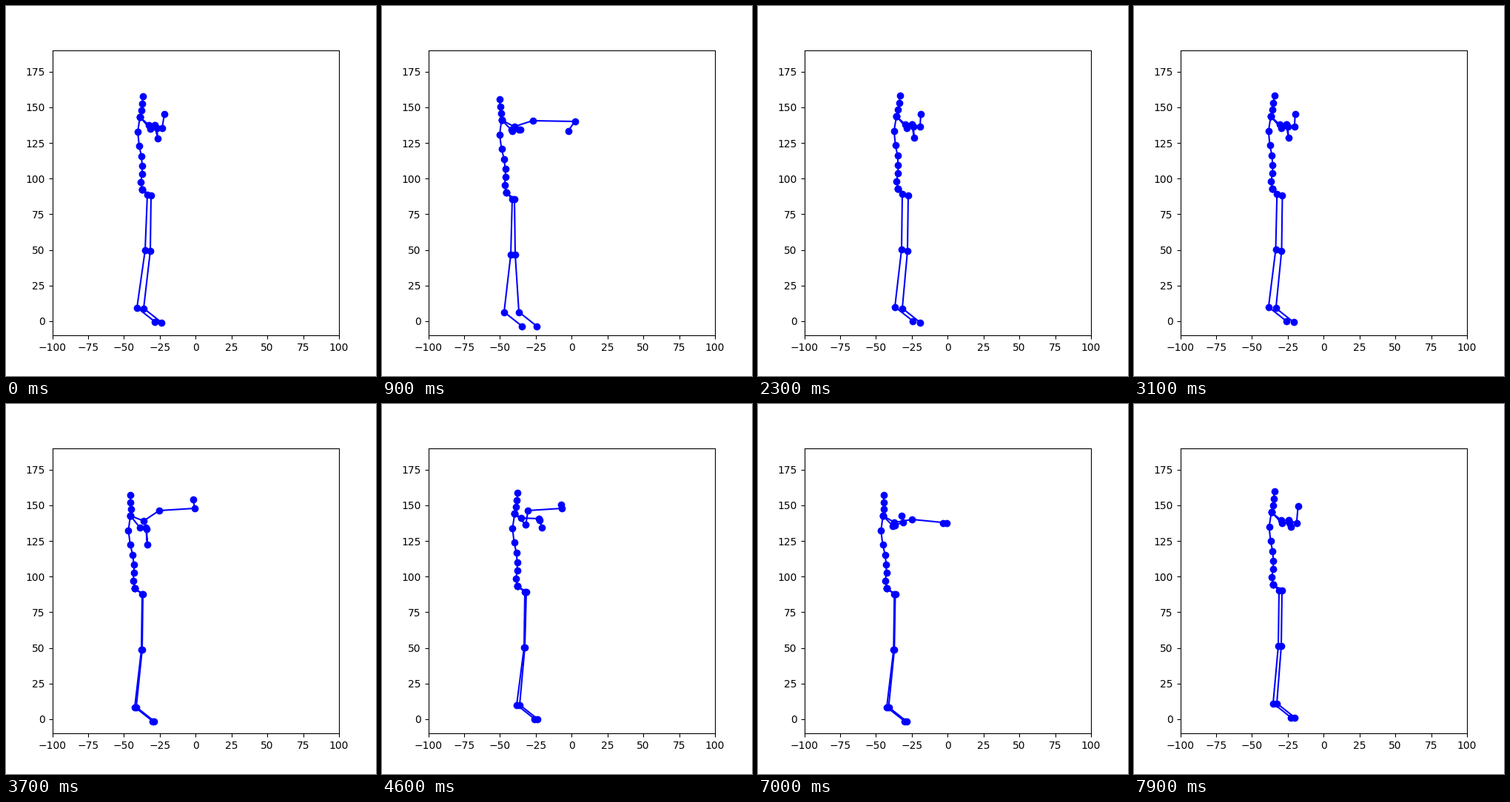
Write a matplotlib script that moves like this. It is 500x500 px and loops after 8000 ms.

```python
import numpy as np
import matplotlib.pyplot as plt
from matplotlib.animation import FuncAnimation

STEP, FRAMES = 100, 80

# Spine from pelvis to head, in stage pixels relative to the pelvis.
SPINE = np.array([(0, 0), (-2, -10), (0, -21), (0, -32), (-1, -45), (-4, -59),
                  (-6, -78), (-3, -98), (-1, -107), (0, -116), (1, -126)], float)
NECK = 7
LEAN = np.minimum(np.arange(11) / NECK, 1)
TILT = np.maximum(np.arange(11) - NECK, 0)

# pelvis x, y, lean, head tilt, then per leg: hip dx, dy, knee dx, ankle dx
BODY = {
    "ready": (184, 248, 0, 0, 7, 7, -3, -11, 12, 8, -1, -9),
    "back": (168, 252, -3.5, -2.3, 8, 9, -2, -9, 11, 9, 1, 5),
    "front": (189, 247, 1, .3, 6, 7, -1, -9, 14, 9, -1, -7),
    "jab": (174, 249, -3, -1.3, 10, 8, -1, -9, 11, 8, -1, -8),
    "cross": (183, 246, -.7, 0, 10, 8, -1, -10, 12, 8, -2, -7),
    "rest": (189, 247, .7, 0, 8, 7, -2, -9, 13, 8, -1, -7),
    "tall": (188, 244, .7, 0, 8, 8, -1, -7, 12, 8, -1, -6),
}

# Collar, shoulder, elbow, wrist of the lead arm, then of the rear arm,
# relative to the neck.
ARMS = {
    "ready": (12, 11, 20, 11, 30, 15, 33, -4, 14, 16, 23, 15, 24, 29, 20, 11),
    "front": (12, 11, 21, 11, 32, 14, 33, -3, 14, 16, 23, 14, 24, 29, 21, 11),
    "rest": (12, 8, 22, 8, 30, 14, 32, -7, 13, 15, 22, 14, 25, 21, 22, 8),
    "tall": (13, 11, 23, 11, 34, 15, 36, -8, 14, 15, 24, 15, 26, 20, 23, 11),
    "cock": (14, 8, 28, 0, 43, -8, 47, -41, 14, 16, 22, 15, 24, 33, 21, 14),
    "jab": (18, 7, 39, -7, 87, -10, 85, -22, 13, 16, 21, 16, 23, 39, 22, 18),
    "hit": (17, 9, 42, 1, 99, 2, 90, 15, 13, 13, 14, 15, 25, 13, 23, 13),
    "reach": (17, 9, 43, 2, 104, 3, 97, 12, 13, 13, 15, 15, 25, 14, 23, 13),
    "load": (12, 8, 30, 8, 36, 18, 36, 2, 15, 15, 20, 4, 36, 2, 38, -28),
    "cross": (9, 6, 33, 7, 37, 19, 34, 9, 15, 15, 18, -4, 64, -7, 63, -12),
    "far": (9, 6, 33, 7, 37, 19, 34, 9, 16, 14, 24, -5, 84, -4, 80, -3),
}

# time, pose, pelvis shift x, y
BODY_KEYS = [
    (0, "ready", 0, 0), (400, "ready", -1, 1), (900, "back", 0, 0),
    (1050, "back", 1, 0), (1500, "ready", 0, 0), (1800, "front", -2, 0),
    (2300, "front", 0, 0), (2900, "front", -1, 0), (3400, "ready", 0, 0),
    (3700, "jab", 0, 0), (3900, "jab", -4, 2), (4300, "cross", -3, 1),
    (4600, "cross", 0, 0), (4800, "cross", 2, 0), (5400, "rest", -2, 0),
    (6000, "rest", 0, 0), (6350, "rest", -3, -2), (6900, "jab", -2, 1),
    (7200, "cross", -1, 0), (7400, "cross", 1, -1), (7700, "tall", -1, 0),
    (7900, "tall", 0, 0),
]

ARM_KEYS = [
    (0, "ready"), (350, "ready"), (550, "cock"), (750, "jab"), (900, "hit"),
    (1000, "reach"), (1400, "ready"), (1800, "front"), (3100, "front"),
    (3500, "cock"), (3700, "jab"), (3900, "hit"), (4300, "ready"),
    (4600, "cross"), (4700, "cross"), (5100, "rest"), (6300, "rest"),
    (6600, "cock"), (6750, "jab"), (6900, "reach"), (7200, "load"),
    (7400, "far"), (7700, "tall"), (7900, "tall"),
]


def smooth(t, times, keys):
    """Cubic through the keys that never overshoots them."""
    h = np.diff(times)[:, None]
    d = np.diff(keys, axis=0) / h
    prod = d[:-1] * d[1:]
    total = d[:-1] + d[1:]
    m = np.zeros_like(keys)
    m[1:-1] = np.where(prod > 0, 2 * prod / np.where(prod > 0, total, 1), 0)
    i = int(np.clip(np.searchsorted(times, t, "right") - 1, 0, len(times) - 2))
    w = h[i, 0]
    u = (t - times[i]) / w
    return ((1 + 2 * u) * (1 - u) ** 2 * keys[i] + u * (1 - u) ** 2 * w * m[i]
            + u * u * (3 - 2 * u) * keys[i + 1] - u * u * (1 - u) * w * m[i + 1])


body_times = np.array([k[0] for k in BODY_KEYS], float)
body_poses = np.array([BODY[k[1]] for k in BODY_KEYS], float)
body_poses[:, :2] += [k[2:] for k in BODY_KEYS]
arm_times = np.array([k[0] for k in ARM_KEYS], float)
arm_poses = np.array([ARMS[k[1]] for k in ARM_KEYS], float)


def leg(root, dx, dy, knee, ankle):
    steps = [(0, 0), (dx, dy), (knee, 75), (ankle, 77.5), (24, 19)]
    return root + np.cumsum(steps, axis=0)


def skeleton(t):
    b = smooth(t, body_times, body_poses)
    root = b[:2]
    spine = root + SPINE
    spine[:, 0] += b[2] * LEAN + b[3] * TILT
    neck = spine[NECK]
    arms = smooth(t, arm_times, arm_poses).reshape(2, 4, 2) + neck
    return [spine, leg(root, *b[4:8]), leg(root, *b[8:12]),
            np.vstack([neck, arms[0]]), np.vstack([neck, arms[1]])]


def to_data(p):
    return (p[:, 0] - 256.25) / 1.9375, (425.75 - p[:, 1]) / 1.925


fig, ax = plt.subplots(figsize=(5, 5), dpi=100)
fig.subplots_adjust(left=0.125, right=0.9, bottom=0.11, top=0.88)
ax.set_xlim(-100, 100)
ax.set_ylim(-10, 190)
chains = [ax.plot([], [], "o-", color="#0000ff", lw=1.5, ms=6)[0]
          for _ in range(5)]


def draw(frame):
    for line, points in zip(chains, skeleton(frame * STEP)):
        line.set_data(*to_data(points))
    return chains


anim = FuncAnimation(fig, draw, frames=FRAMES, interval=STEP,
                     init_func=lambda: draw(0), repeat=True, blit=False)
plt.show()
```
